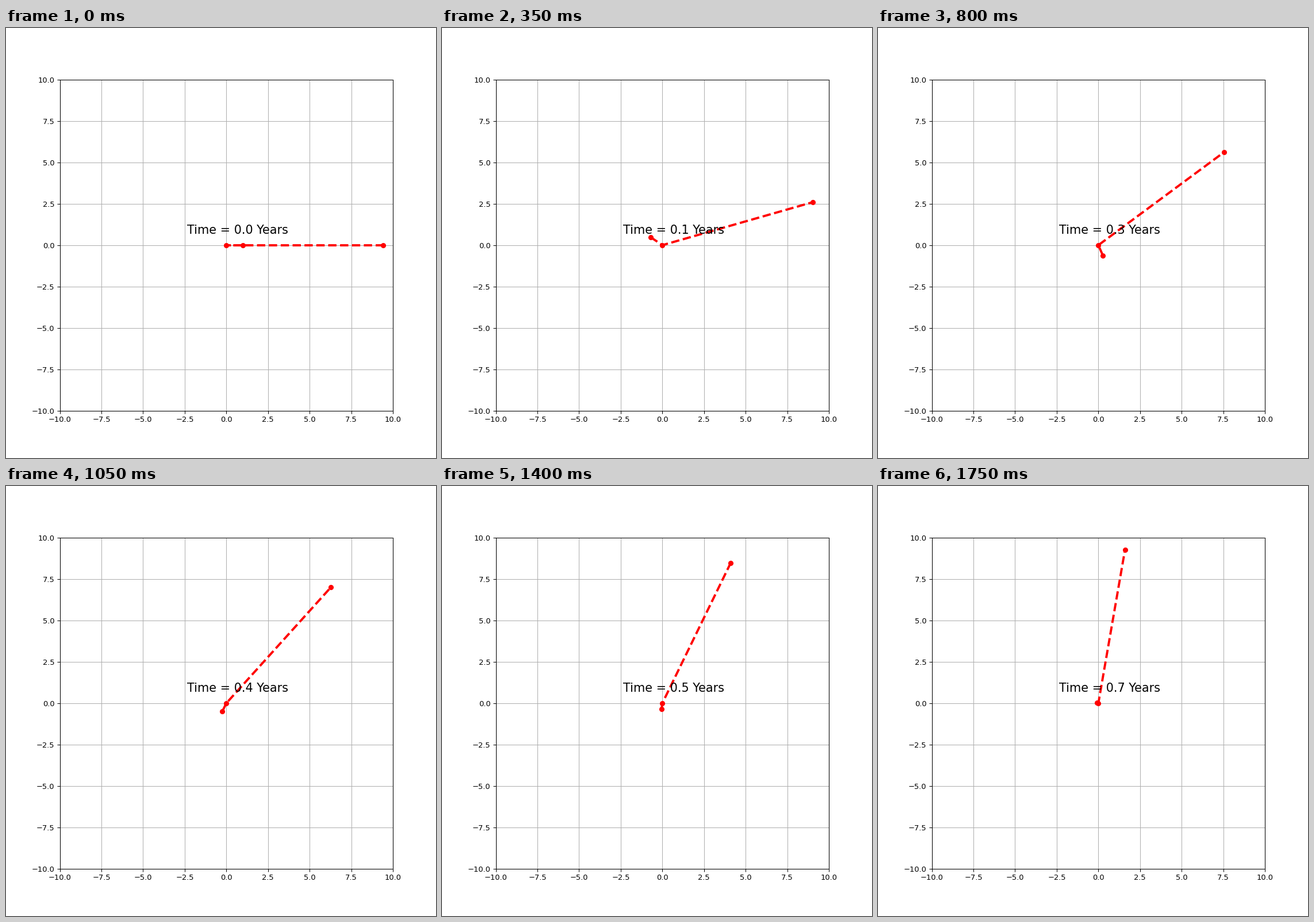
A matplotlib script that plays this animation: 748x748 px, repeating every 1800 ms.

```python
import numpy as np
import matplotlib.pyplot as plt
from matplotlib.animation import FuncAnimation

FRAMES, INTERVAL = 36, 50
YEARS_PER_FRAME = 0.019

# Outer body: steady circle. Inner body: decaying orbit with Kepler's rate.
OUTER_R, OUTER_STEP = 9.39, 0.04
RATE, DECAY, MERGE = 1.1502, 35.62, 36.12

plt.rcParams["font.family"] = "DejaVu Sans"

steps = np.arange(FRAMES)
inner_r = (1 - steps / MERGE) ** (2 / 3)
speed = RATE / (1 - steps / DECAY)
inner_phase = np.concatenate(([0], np.cumsum(speed[:-1])))


def polar(r, phase):
    return r * np.cos(phase), r * np.sin(phase)


fig, ax = plt.subplots(figsize=(8, 8), dpi=93.5)
fig.subplots_adjust(left=0.125, right=0.9, bottom=0.11, top=0.88)
ax.set(xlim=(-10, 10), ylim=(-10, 10))
ticks = np.arange(-10, 10.1, 2.5)
ax.set_xticks(ticks)
ax.set_yticks(ticks)
ax.grid(True)

line, = ax.plot([], [], "ro--", lw=3)
label = fig.text(315 / 748, 390.4 / 748, "", fontsize=16, va="baseline")


def update(i):
    x1, y1 = polar(inner_r[i], inner_phase[i])
    x2, y2 = polar(OUTER_R, OUTER_STEP * i)
    line.set_data([x1, 0, x2], [y1, 0, y2])
    label.set_text(f"Time = {YEARS_PER_FRAME * i:.1f} Years")
    return line, label


anim = FuncAnimation(fig, update, frames=FRAMES, interval=INTERVAL,
                     repeat=True, repeat_delay=0, blit=False)
plt.show()
```
